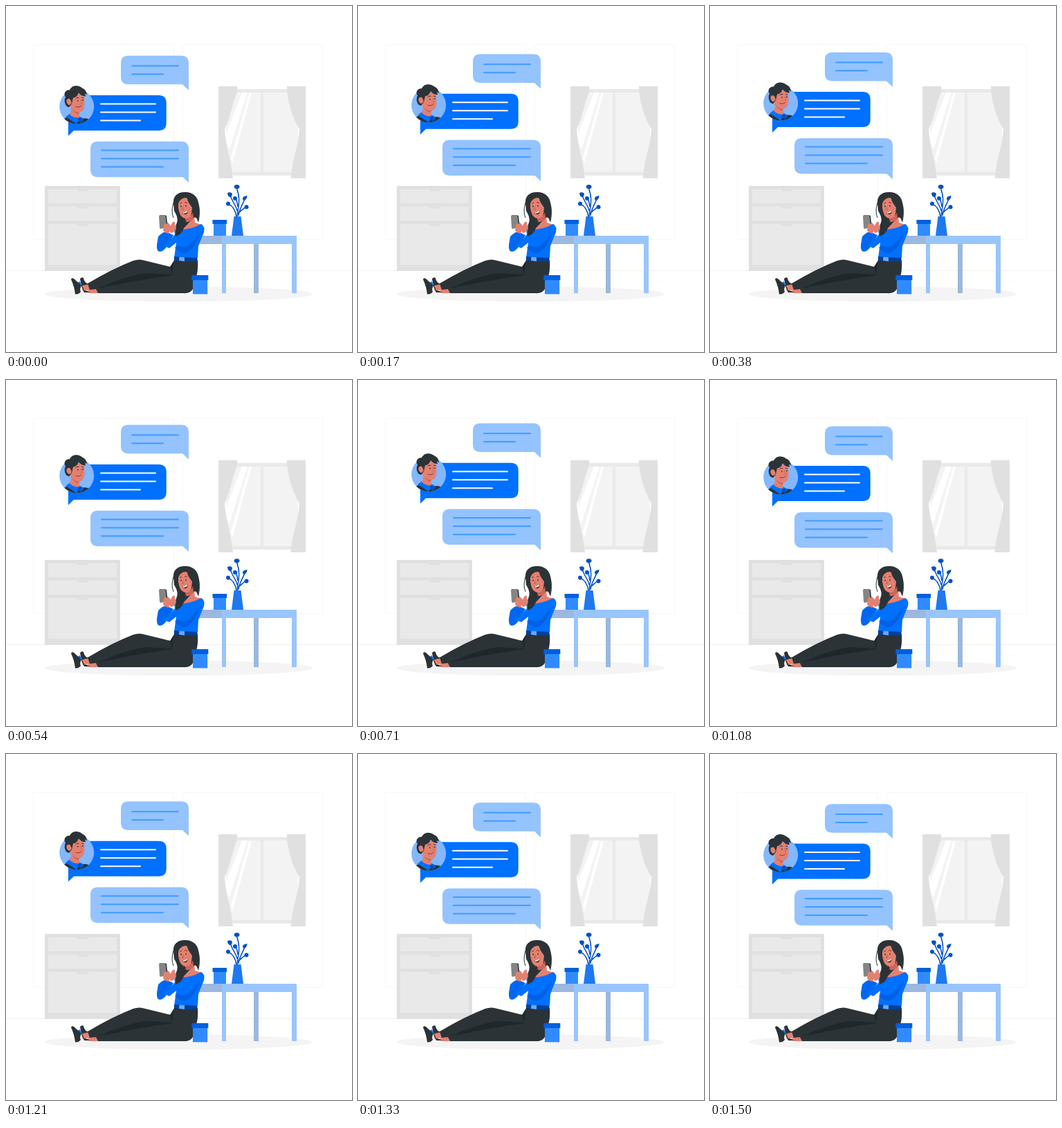
Write an HTML page that moves like this. It is 500 px wide and 500 px high and loops after 1.54 s.

```html
<!DOCTYPE html>
<html lang="en">
<head>
<meta charset="utf-8">
<title>Chat at home</title>
<style>
  @property --k { syntax: "<number>"; inherits: false; initial-value: 0; }
  html, body { margin: 0; width: 100%; height: 100%; overflow: hidden; background: #fff; }
  svg { display: block; width: 100vw; height: 100vh; }

  /* 37 even steps: up 10px and back at constant speed */
  .chat {
    animation: float 1540ms steps(37, jump-start) -5ms infinite;
    transform: translateY(calc(min(var(--k), 37 - var(--k)) * -10px / 18.5));
  }
  @keyframes float { from { --k: 0; } to { --k: 37; } }

  .line { fill: none; stroke-width: 2; stroke-linecap: round; }
  .pale { fill: #94c3ff; }
  .blue { fill: #0070ff; }
  .mid { fill: #2f8bff; }
  .deep { fill: #0060dc; }
  .navy { fill: #0050c4; }
  .dark { fill: #2b3337; }
  .skin { fill: #e4806f; }
  .flush { fill: #cb665a; }
  .g1 { fill: #e0e0e0; }
  .g2 { fill: #e9e9e9; }
  .g3 { fill: #f3f3f3; }
</style>
</head>
<body>
<svg viewBox="0 0 500 500">
  <!-- room -->
  <g fill="none" stroke="#f7f7f7">
    <rect x="39.5" y="55.5" width="203" height="282" rx="2"/>
    <rect x="255" y="55.5" width="203" height="282" rx="2"/>
    <path d="M0 382.5H500" stroke="#f0f0f0"/>
    <path d="M416 398.5H449" stroke="#fafafa"/>
  </g>
  <ellipse cx="249.500" cy="416.300" rx="193.500" ry="11" fill="#f4f4f4"/>

  <!-- window -->
  <rect class="g2" x="318" y="120" width="104" height="125"/>
  <path class="g3" d="M318 125H368V240H318zM372 125H422V240H372z"/>
  <g fill="#fff">
    <path d="M341 125H349L322.500 208L316 190zM351.500 125H355L327 228L325 219z"/>
    <path d="M316 178C319 200 324 225 327.500 245L316 245z"/>
    <path d="M424 178C421 200 416 225 412.500 245L424 245z"/>
  </g>
  <path class="g1" d="M307 116H334V124C328 137 324 162 316 178C317 200 325 220 328 249H307z"/>
  <path class="g1" d="M433 116H406V124C409 145 415 164 424 178C423 200 414 220 411.500 249H433z"/>

  <!-- cabinet -->
  <rect class="g1" x="56" y="260" width="109" height="123"/>
  <path class="g2" d="M61 265H160V285H61zM61 289.500H160V310H61zM61 315H160V374H61z"/>
  <path id="pull" class="g1" d="M101 265H120L117 267.700Q116 268 115 268H106Q105 268 104 267.700z"/>
  <use href="#pull" y="24.700"/>
  <use href="#pull" y="50"/>

  <!-- table -->
  <path fill="#9ab8e0" d="M279 332H313V344H279zM358 343H365V415H358z"/>
  <path fill="#99c5ff" d="M312 332H420V415H413V344H318V415H312z"/>
  <g id="jar">
    <path class="mid" d="M300 314H318V332H300z"/>
    <path class="deep" d="M298.500 309H319V315H298.500z"/>
  </g>
  <path fill="none" stroke="#0050c4" stroke-width="1.500"
    d="M334 305C335 290 340 281 333 262M333 305C332 296 328 289 321 286M334 296C333 288 325 281 324 272M335 300C341 295 343 292 348 290M336 303C337 292 343 287 345 278M335 290Q334 281 331 277"/>
  <g class="navy">
    <ellipse cx="333.600" cy="261.300" rx="3.900" ry="3"/>
    <circle cx="321" cy="285.700" r="3"/>
    <circle cx="331" cy="278" r="3"/>
    <circle cx="347.500" cy="290.500" r="3"/>
    <path d="M320 270Q326 268 327 272Q326 276 324 276.500Q320 275 320 270zM348.500 274Q342 275 342 278Q342 281 344.500 281Q348.500 279 348.500 274z"/>
  </g>
  <path fill="#1f78f0" d="M329.500 304H339.500L343 332H326z"/>

  <!-- legs -->
  <path class="skin" d="M108 403L121 400L123 409L111 412zM118 409L131 407L133 415H120z"/>
  <path class="blue" d="M103 400L107 398L109 404L106 405z"/>
  <path class="dark" d="M94 395Q95 392 98 394L109 404Q106 409 108 413Q105 417 100 416.500Q99 406 94 395z"/>
  <path class="dark" d="M107 394Q110 391 112 393Q113 400 120 402L110 404L113 411Q118 411 121 414H113Q109 407 107 394z"/>
  <path class="dark" d="M118 401Q155 379 184 368Q193 365 201 368L238 377L243 367H277C278 382 276 389 272 401Q271 414 260 415H133L130 409L121 410z"/>
  <path fill="#1e272b" d="M133 408Q174 390 201 386L240 388L237 377L242 369L240 389Q190 396 133 408z"/>

  <!-- torso and arms -->
  <path class="skin" d="M257 301H272L273 313L283 316L272 324L245 324L249 317L259 314z"/>
  <path fill="#0068f0" d="M220 333Q226 327 231 326L242 331L236 341Q230 354 223 355Q217 355 218 345z"/>
  <path class="blue" d="M243 323Q264 325 282 315Q288 318 286 327Q281 339 278 347L277 364H243L246 342L236 350L229 347L244 330z"/>
  <path fill="#0061e2" d="M281 328Q273 350 260 357Q252 359 244 349L249 346Q259 353 268 342z"/>
  <path fill="#003f98" d="M243 362L276.500 364V370L243 367.500z"/>
  <path fill="#66abff" d="M250.500 362.500L258 363V369L250 368z"/>

  <!-- head -->
  <path class="dark" d="M242 285C241 274 249 268 260 269C270 269 277 276 278 284C281 295 280 303 277 312C276 306 274 304 270 307L257 321C254 329 249 332 245 332.500C247 326 243 321 247 313C249 307 246 301 243 296z"/>
  <path class="skin" d="M249 285C252 278 258 276 263 278C269 280 270 290 268 299Q268 306 262 307.500C253 307 248 300 249 285z"/>
  <path class="flush" d="M259 307Q267 307 270 298L271 307Q267 313 260 312z"/>
  <path class="dark" d="M249 286C250 278 257 276 262 276C261 282 267 288 271 294L274 284L263 273L250 276L244 287C247 296 251 302 254 309L248 316L245 330Q256 326 258 313C251 303 248 294 249 286z"/>
  <path fill="none" stroke="#2b3337" stroke-width="1" d="M277 283Q281 298 278 312M242 284Q238 297 242 306"/>
  <path fill="none" stroke="#2b3337" stroke-width=".8" d="M251 286L254 284M258 284Q260 283 262 285"/>
  <circle class="dark" cx="253" cy="289.500" r=".9"/>
  <circle class="dark" cx="260" cy="289" r=".9"/>
  <path class="flush" d="M256 289L254 295L257 295z"/>
  <path fill="#7d2e32" d="M255 298Q259 298 262.500 295Q263 301 259 301.500Q256 301 255 298z"/>
  <path fill="#fff" d="M255.500 298Q259 298 262 295.500L262 297.500Q259 300 256.500 299.500z"/>

  <!-- phone and hands -->
  <path class="skin" d="M227 317L233 313Q237 314 238 319L235 329L229 327zM235 322L241 312Q245 311 244 315L246 321Q243 328 238 328z"/>
  <path class="dark" d="M229 302L232 303L233.500 318L229 321z"/>
  <path fill="#858585" d="M222 302H230.500L232 319.500L224 322Q222 322 222 320L221 304z"/>
  <path class="skin" d="M228 316Q230 313 234 315L236 321L232 327L227 325z"/>

  <use href="#jar" transform="translate(-82.500 20.300) scale(1.175 1.193)"/>

  <!-- messages -->
  <g class="chat">
    <path class="pale" d="M177 72.300H253Q264 72.300 264 83.300V122.300L255 113.800H177Q166 113.800 166 102.800V83.300Q166 72.300 177 72.300z"/>
    <path class="line" stroke="#409aff" d="M182 87H249M182 99H227"/>

    <path class="blue" d="M101 129.500H220.500Q231.700 129.500 231.700 140.500V169.500Q231.700 180.500 220.500 180.500H98L90 188.400V140.500Q90 129.500 101 129.500z"/>
    <path class="line" stroke="#fff" d="M137 142H216M137 154H216M137 166H194"/>

    <path class="pale" d="M133 196.300H253Q264 196.300 264 207.300V255.800L255.500 247.800H133Q122 247.800 122 236.800V207.300Q122 196.300 133 196.300z"/>
    <path class="line" stroke="#409aff" d="M138 209H249M138 221H249M138 233H227"/>

    <!-- avatar -->
    <clipPath id="disc"><circle cx="102.200" cy="146" r="25"/></clipPath>
    <circle cx="102.200" cy="146" r="25" fill="#83b7ff"/>
    <g clip-path="url(#disc)">
      <path class="dark" d="M80 168Q84 162 91 160L112 163Q118 162 123 167V173H80z"/>
      <path class="blue" d="M86 161L92 156L106 160L112 163L110 168L105 166L102 171L90 163z"/>
      <path class="navy" d="M104 161L110 163L109 170L104 167z"/>
    </g>
    <path class="skin" d="M93 146L105 152L106 162Q98 163 92 157L94 152z"/>
    <path class="flush" d="M96 150L106 153.500L105 157Q99 156 96 150z"/>
    <path class="skin" d="M93 130L110 127Q114 131 113.500 140C114 149 111 154 105 154C99 154 94 149 93 143z"/>
    <path class="dark" d="M87 145Q83 138 86 132C82 127 87 121 92 122C95 115 104 114 110 119Q116 121 117 129L114 127L115 131Q109 131 105 126Q102 133 97 133L95 142L91 147z"/>
    <ellipse class="skin" cx="91" cy="139" rx="3.300" ry="4.500" transform="rotate(-20 91 139)"/>
    <g fill="none" stroke="#2b3337" stroke-width=".9" stroke-linecap="round">
      <path d="M101 134Q103 132 105 133M109.500 133L112 133.500"/>
      <path d="M101 146Q106 148 109 144.500" stroke="#7d2e32"/>
      <path d="M108 136L110 141L107.500 142" stroke="#cb665a"/>
    </g>
    <circle class="dark" cx="104" cy="137.500" r=".9"/>
    <circle class="dark" cx="110.800" cy="136.800" r=".9"/>
  </g>
</svg>
</body>
</html>
```
